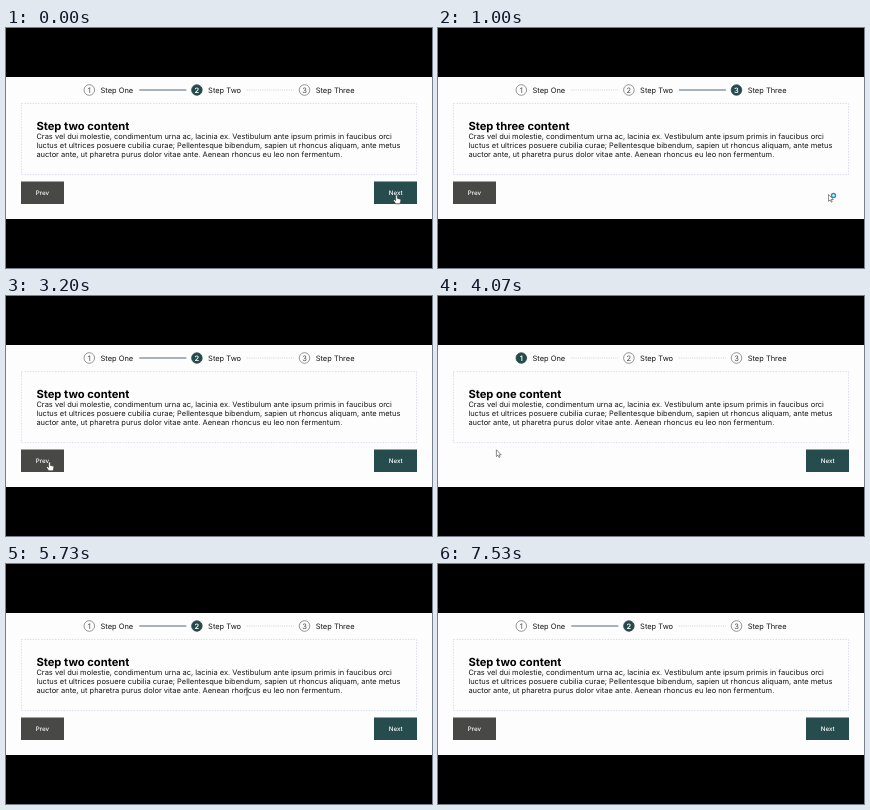
Recreate the animation shown at these times as an HTML page. Size 426x240 px, loop 7.59 s.

```html
<!DOCTYPE html>
<html lang="en">
<head>
<meta charset="utf-8">
<title>Stepper</title>
<style>
html, body { margin: 0; width: 100%; height: 100%; overflow: hidden; background: #000; }
svg { display: block; width: 426px; height: 240px; font-family: Inter, "Liberation Sans", sans-serif; }
text { font-size: 7.47px; fill: #161616; text-rendering: geometricPrecision; }
.title { font-size: 11.2px; font-weight: 700; fill: #000; }
.label { font-size: 6.2px; font-weight: 500; fill: #fff; text-anchor: middle; }
.num { text-anchor: middle; }
</style>
</head>
<body>
<svg viewBox="0 0 426 240">
  <defs><clipPath id="clip"><rect y="49" width="426" height="142"/></clipPath></defs>
  <rect width="426" height="240"/>
  <rect y="49" width="426" height="142" fill="#fdfdfd"/>
  <g id="steps"></g>
  <rect x="15.5" y="75.5" width="395" height="71" fill="none" stroke="#d6d8e8" stroke-width=".9" stroke-dasharray="1.4 1.4"/>
  <text class="title" id="title" x="30.4" y="101.6"></text>
  <text x="30.4" y="111">Cras vel dui molestie, condimentum urna ac, lacinia ex. Vestibulum ante ipsum primis in faucibus orci</text>
  <text x="30.4" y="120.1">luctus et ultrices posuere cubilia curae; Pellentesque bibendum, sapien ut rhoncus aliquam, ante metus</text>
  <text x="30.4" y="129.2">auctor ante, ut pharetra purus dolor vitae ante. Aenean rhoncus eu leo non fermentum.</text>
  <g id="prev">
    <rect x="15" y="153.5" width="43" height="22.5" fill="#484846"/>
    <text class="label" x="36.5" y="166.8">Prev</text>
  </g>
  <g id="next">
    <rect x="368" y="153.5" width="43" height="22.5" fill="#264c4e"/>
    <text class="label" x="389.7" y="166.8">Next</text>
  </g>
  <g clip-path="url(#clip)">
    <g id="cursor" stroke-linejoin="round">
      <path id="hand" fill="#fff" stroke="#333" stroke-width=".6" d="M-.9 .6Q0-.5 .9 .6V3.4L3.6 4.1Q4.5 4.5 4.3 5.6L3.6 8.8H-.8L-3 5.6Q-3.1 4.4-2 4.7L-.9 5.6Z"/>
      <path id="arrow" fill="#fff" stroke="#444" stroke-width=".6" d="M0 0V6.8L1.6 5.4L2.7 7.7L3.7 7.2L2.7 5H4.8Z"/>
      <circle id="busy" cx="5" cy="1" r="2" fill="#d8efff" stroke="#2b8ecb" stroke-width="1.4"/>
      <path id="beam" fill="none" stroke="#555" stroke-width=".7" d="M-1.5-3.5H1.5M0-3.5V3.5M-1.5 3.5H1.5"/>
    </g>
  </g>
</svg>
<script>
const LOOP = 7590;
const DARK = '#264a4c';
const names = ['One', 'Two', 'Three'];
const $ = id => document.getElementById(id);

$('steps').innerHTML = names.map((name, i) => {
  const x = 83.3 + i * 107.6;
  const line = i < 2 ? `<path class="line" d="M${x + 50} 62H${x + 97}"/>` : '';
  return `<circle class="dot" cx="${x}" cy="62" r="5.3" stroke-width=".75"/>
    <text class="num" x="${x}" y="64.7">${i + 1}</text>
    <text x="${x + 11.2}" y="64.7">Step ${name}</text>${line}`;
}).join('');
const all = c => [...document.querySelectorAll(c)];
const dots = all('.dot'), nums = all('.num'), lines = all('.line');

// [start, active step]
const clicks = [[0, 1], [330, 2], [2930, 1], [3730, 0], [5330, 1]];
// [time, x, y, pointer shown from then on]
const path = [
  [0, 390.5, 167, 'hand'], [330, 390.5, 167, 'busy'], [1070, 390.5, 166.5, 'arrow'],
  [1800, 50.5, 166, 'hand'], [2470, 50.5, 166, 'hand'], [2600, 43.5, 166, 'hand'],
  [3930, 43.5, 166, 'arrow'], [4600, 174, 59, 'hand'], [4870, 174, 59, 'hand'],
  [5200, 191, 61, 'hand'], [5400, 191, 61, 'arrow'], [5600, 241, 127.5, 'beam'],
  [6000, 241, 127.5, 'arrow'], [6600, 300, 196, ''], [LOOP, 300, 196, '']
];
const ease = p => p * p * (3 - 2 * p);

function setStep(active) {
  dots.forEach((d, i) => {
    d.setAttribute('fill', i === active ? DARK : '#fdfdfd');
    d.setAttribute('stroke', i === active ? DARK : '#70767a');
    nums[i].style.fill = i === active ? '#fff' : '#444';
    nums[i].style.fontWeight = i === active ? 600 : 400;
  });
  lines.forEach((l, i) => {
    const on = i === active - 1;
    l.setAttribute('stroke', on ? '#53677a' : '#c9c8d6');
    l.setAttribute('stroke-width', on ? 1.2 : .9);
    l.setAttribute('stroke-dasharray', on ? 'none' : '1 1.2');
  });
  $('title').textContent = `Step ${names[active].toLowerCase()} content`;
  $('prev').style.display = active > 0 ? '' : 'none';
  $('next').style.display = active < 2 ? '' : 'none';
}

function setCursor(t) {
  const i = path.findLastIndex(k => k[0] <= t);
  const a = path[i], b = path[i + 1];
  const p = ease((t - a[0]) / (b[0] - a[0]));
  $('cursor').setAttribute('transform',
    `translate(${a[1] + (b[1] - a[1]) * p} ${a[2] + (b[2] - a[2]) * p})`);
  const show = (id, on) => { $(id).style.display = on ? '' : 'none'; };
  for (const id of ['hand', 'beam', 'busy']) show(id, a[3] === id);
  show('arrow', a[3] === 'arrow' || a[3] === 'busy');
}

let step = -1;
function draw() {
  const t = performance.now() % LOOP;
  const now = clicks.findLast(c => c[0] <= t)[1];
  if (now !== step) setStep(step = now);
  setCursor(t);
  requestAnimationFrame(draw);
}
draw();
</script>
</body>
</html>
```
